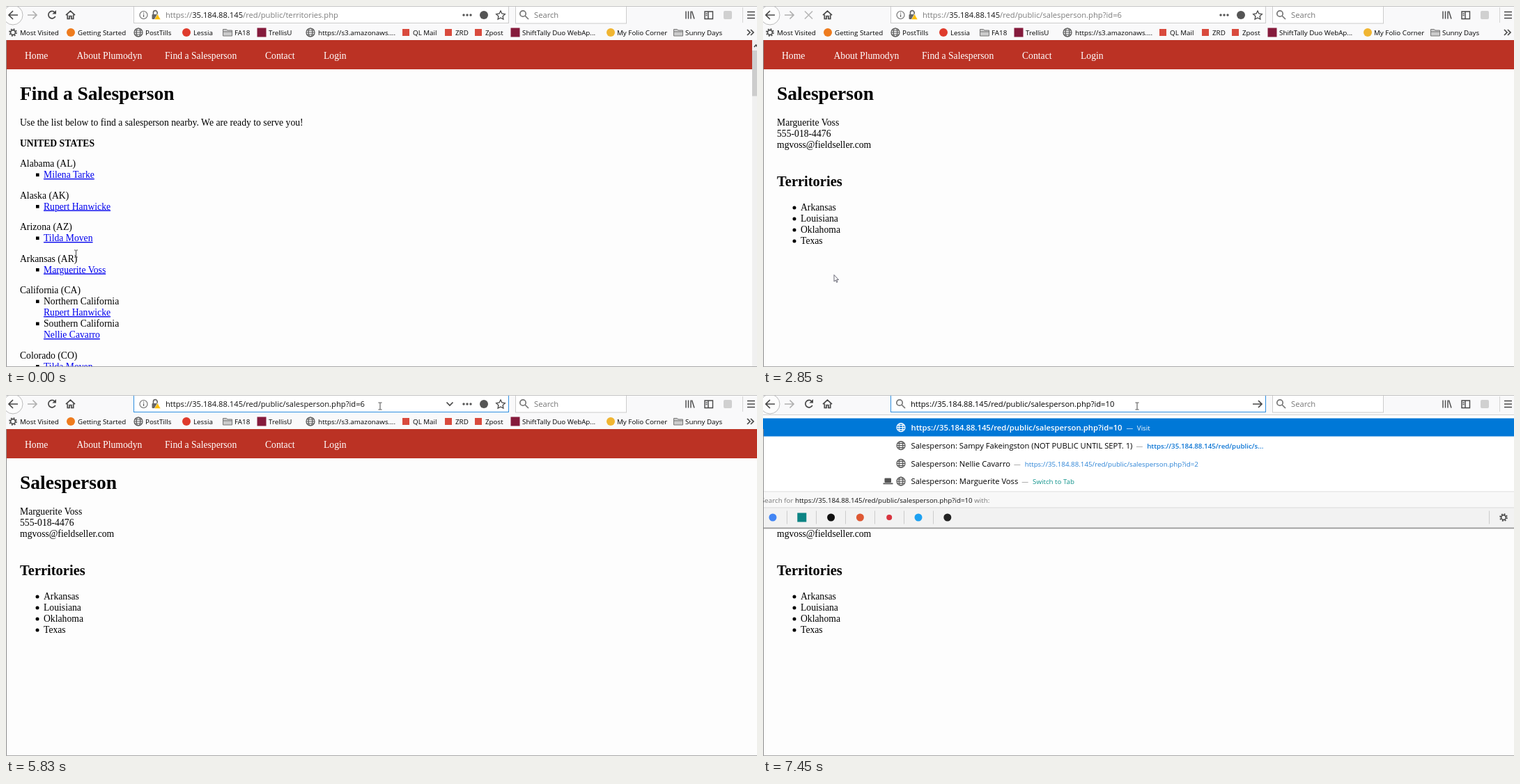
Animation, 1078 px wide and 519 px high, one loop 8000 ms. Source, as an HTML page:

```html
<!DOCTYPE html>
<html lang="en">
<head>
<meta charset="utf-8">
<title>Find a Salesperson</title>
<style>
html, body { margin: 0; width: 100%; height: 100%; overflow: hidden; background: #fdfdfd; }
svg { display: block; }
text { white-space: pre; }
.page { font: 13.68px "Liberation Serif", "Times New Roman", serif; }
.h1 { font-size: 27.5px; font-weight: bold; }
.h2 { font-size: 20.5px; font-weight: bold; }
.b { font-weight: bold; }
.link { fill: #00e; text-decoration: underline; }
.ui { font: 11.2px "Open Sans", "Noto Sans", sans-serif; }
.mark { font-size: 9.8px; }
.small { font-size: 9.75px; }
.semi { font-weight: 600; }
.line { fill: none; stroke: #484848; stroke-width: 1.7; }
</style>
</head>
<body>
<svg id="stage" width="1078" height="519" viewBox="0 0 1078 519"></svg>
<script>
const LOOP = 8000;
const HOST = '35.184.88.145';
const SALES = '/red/public/salesperson.php?id=';

const text = (x, y, s, cls = '', fill = '#000') => `<text x="${x}" y="${y}" class="${cls}" fill="${fill}">${s}</text>`;
const rect = (x, y, w, h, fill, more = '') => `<rect x="${x}" y="${y}" width="${w}" height="${h}" fill="${fill}" ${more}/>`;
const dot = (x, y, r, fill) => `<circle cx="${x}" cy="${y}" r="${r}" fill="${fill}"/>`;
const line = (d, more = '') => `<path class="line" d="${d}" ${more}/>`;
const at = (x, y, s) => `<g transform="translate(${x} ${y})">${s}</g>`;
// Content visible from one time up to another
const during = (from, to, s) => `<g data-from="${from}" data-to="${to}">${s}</g>`;

const globe = (x, y, color = '#555') => at(x, y, `<g fill="none" stroke="${color}" stroke-width="1.2">
  <circle r="6"/><ellipse rx="2.8" ry="6"/><path d="M-6 0H6M-5 -3H5M-5 3H5"/></g>`);
const gear = (x, y) => at(x, y, `<g fill="none" stroke="#484848" stroke-width="1.6"><circle r="3.4"/>
  <circle r="5" stroke-dasharray="2 1.93"/></g>`);
const folder = (x, y) => at(x, y, `<path d="M-6.5 5V-4.5H-1.5L0 -3H6.5V5ZM-6.5 -1H6.5" fill="#ccc" stroke="#777"/>`);
const lens = (x, y, color = '#777') => line(`M${x + 1} ${y + 2}l5 5`, `style="stroke:${color}"`)
  + `<circle class="line" cx="${x - 2}" cy="${y - 1}" r="4.2" style="stroke:${color}"/>`;
const block = (x, y, fill, size = 13) => rect(x - size / 2, y - size / 2, size, size, fill);

// Cursors
const arrow = (x, y) => at(x, y, '<path d="M0 0V9.6L2.2 7.6 3.7 10.9 5 10.3 3.6 7.1H6.5Z" fill="#fff" stroke="#445" stroke-width=".8"/>');
const beam = (x, y) => at(x, y, '<path d="M-2.5 -5H-.6L0 -4.5 .6 -5H2.5M0 -4.5V4.5M-2.5 5H-.6L0 4.5 .6 5H2.5" fill="none" stroke="#333" stroke-width=".9"/>');
const hand = (x, y) => at(x, y, `<path d="M-1 7V1Q0 -.6 1 1V5L5 6Q6 6.5 5.6 8.5L4.6 12H-.2L-3.4 8Q-3.6 6.3 -2.4 6.5Z"
  fill="#fff" stroke="#333" stroke-width=".9"/>`);

function page() {
  const nav = [[27, 'Home'], [101.5, 'About Plumodyn'], [228, 'Find a Salesperson'], [372, 'Contact'], [456, 'Login']];
  return rect(0, 49, 1078, 42, '#bb3224') + nav.map(([x, s]) => text(x, 76, s, '', '#fff')).join('');
}

function territories() {
  const states = [
    ['Alabama (AL)', '*Milena Tarke'], ['Alaska (AK)', '*Rupert Hanwicke'], ['Arizona (AZ)', '*Tilda Moven'],
    ['Arkansas (AR)', '*Marguerite Voss'],
    ['California (CA)', 'Northern California', '*Rupert Hanwicke', 'Southern California', '*Nellie Cavarro'],
    ['Colorado (CO)', '*Tilda Moven'],
  ];
  let y = 231;
  let out = text(20, 135, 'Find a Salesperson', 'h1')
    + text(20, 172, 'Use the list below to find a salesperson nearby. We are ready to serve you!')
    + text(20, 201.5, 'UNITED STATES', 'b');
  for (const [state, ...people] of states) {
    out += text(20, y, state);
    people.forEach((p, i) => {
      y += 16;
      const linked = p[0] === '*';
      if (i % 2 === 0) out += rect(43, y - 6.5, 4.6, 4.6, '#000');
      out += linked ? text(54, y, p.slice(1), 'link', '#00e') : text(54, y, p);
    });
    y += 29.5;
  }
  return out + rect(1071, 49, 7, 470, '#f0f0f0') + rect(1071, 64, 7, 65.5, '#cdcdcd')
    + line('M1074 59l2.5 -3 2.5 3', 'stroke-width="1.2"');
}

function person() {
  const places = ['Arkansas', 'Louisiana', 'Oklahoma', 'Texas'];
  return text(20, 135, 'Salesperson', 'h1')
    + ['Marguerite Voss', '555-018-4476', 'mgvoss@fieldseller.com'].map((s, i) => text(20, 172 + 16 * i, s)).join('')
    + text(20, 259, 'Territories', 'h2')
    + places.map((s, i) => dot(45, 290 + 16 * i, 2.5, '#000') + text(54, 294 + 16 * i, s)).join('');
}

function bookmarks() {
  const square = c => x => block(x, 38, c);
  const round = c => x => dot(x, 38, 6, c);
  const world = x => globe(x, 38);
  const files = x => folder(x, 38);
  const mail = x => block(x, 38, '#d94a3d', 10);
  const items = [
    [10, 20, 'Most Visited', x => gear(x, 38)], [93, 103, 'Getting Started', round('#ee7b1e')],
    [190, 200, 'PostTills', world], [259, 269, 'Lessia', round('#df3b2c')], [318, 328, 'FA18', files],
    [367, 377, 'TrellisU', square('#851b3c')], [437, 448, 'https://s3.amazonaws....', world],
    [574, 584, 'QL Mail', mail], [635, 645, 'ZRD', mail], [678, 688, 'Zpost', mail],
    [731, 741, 'ShiftTally Duo WebAp...', square('#851b3c')], [868, 877, 'My Folio Corner', round('#f0b531')],
    [965, 975, 'Sunny Days', files],
  ];
  return items.map(([x, tx, s, icon]) => icon(x) + text(tx, 42, s, 'mark')).join('')
    + line('M1064 34l4 4 -4 4M1069 34l4 4 -4 4');
}

function toolbar() {
  const stop = c => line('M60 7.5l11 11M71 7.5l-11 11', `style="stroke:${c}"`);
  const reload = c => line('M70 9.2A5.2 5.2 0 1 0 70.8 14.8', `style="stroke:${c}"`) + `<path d="M72 6v5.6h-5.6Z" fill="${c}"/>`;
  const dark = '#484848', pale = '#b8b8b8';
  return '<circle cx="10" cy="13" r="14" fill="#fdfdfd" stroke="#bbb"/>'
    + line('M17 13H4M10 7l-6 6 6 6') + line('M31 13H44M38.5 7.5l5.5 5.5 -5.5 5.5', 'style="stroke:#b0b0b0"')
    + during(0, 1120, reload(dark)) + during(1120, 2850, stop(dark)) + during(2850, 3010, stop(pale))
    + during(3010, 3740, reload(pale)) + during(3740, LOOP, reload(dark))
    + line('M86 13.2l6.5 -6 6.5 6M88.3 12.5v6h2.8v-4h2.8v4h2.8v-6')
    + rect(731.5, -1, 159, 26, '#fff', 'stroke="#ccc"') + lens(744, 12) + text(758, 17, 'Search', '', '#777')
    + line('M976 7.5v11M979.5 7.5v11M983 7.5v11M984.5 7.5l3.5 11', 'style="stroke-width:1.4"')
    + line('M1003 8h11.5v10.5h-11.5ZM1008 8v10.5M1004.5 11h2M1004.5 13.5h2', 'style="stroke-width:1.4"')
    + rect(1030, 7, 12, 12, '#d0d0d0', 'rx="2"') + rect(1057, 2, 1, 22, '#d5d5d5')
    + line('M1064 8.5h11M1064 13h11M1064 17.5h11');
}

function addressBar() {
  const frame = (from, to, c) => during(from, to, rect(183.5, -1, 538, 25.5, '#fff', `stroke="${c}"`));
  const address = (path, strong = '#111', weak = '#7d7d7d') =>
    text(229, 17, `https://<tspan fill="${strong}">${HOST}</tspan>${path}`, '', weak);
  const typed = (from, to, id) => during(from, to, text(212, 17, `https://${HOST}${SALES}${id}`));
  const icons = '<circle class="line" cx="197.5" cy="13" r="5.5" style="stroke:#666;stroke-width:1.1"/>'
    + rect(196.9, 12, 1.3, 4, '#666') + rect(196.9, 9.5, 1.3, 1.4, '#666')
    + line('M211.5 12V9.5a2.8 2.8 0 0 1 5.6 0V12', 'style="stroke:#666"') + rect(209.5, 12, 9, 7, '#666', 'rx="1"')
    + '<path d="M217.5 11.5l4.5 8h-9Z" fill="#ffbf00" stroke="#fff" stroke-width=".6"/>'
    + [657, 662, 667].map(x => dot(x, 13, 1.7, '#555')).join('') + dot(686, 13, 6, '#555')
    + line('M710 7l1.9 4 4.4.6 -3.2 3.1.8 4.4 -3.9 -2.1 -3.9 2.1.8 -4.4 -3.2 -3.1 4.4 -.6Z', 'style="stroke-width:1.3"');
  const chevron = line('M632.5 10.5l4.5 4.5 4.5 -4.5');
  return frame(0, 4160, '#ccc') + frame(4160, 4820, '#aaa') + frame(4820, LOOP, '#2f8fe0')
    + during(0, 6260, icons)
    + during(4160, 4570, `<g opacity=".85">${chevron}</g>`) + during(4570, 6260, chevron)
    + during(0, 1120, address('/red/public/territories.php'))
    + during(1120, 4820, address(SALES + 6))
    + during(4820, 4960, address(SALES + 6, '#111', '#111'))
    + during(4960, 5520, rect(229, 4, 286, 16, '#0078d7') + address(SALES + 6, '#fff', '#fff'))
    + during(5520, 6260, address(SALES + 6, '#111', '#111'))
    + during(5520, 5830, rect(514, 4, 1, 16, '#000'))
    + during(6260, LOOP, lens(198, 12) + line('M703 13H716M711 8l5 5 -5 5'))
    + typed(6260, 6980, '') + typed(6980, 7450, 1) + typed(7450, LOOP, 10)
    + during(6260, 6980, rect(491, 5, 1, 15, '#000'));
}

function searchStrip(id) {
  const engines = ['#4285f4', '', '#111', '#de5833', '#d8343f', '#1da1f2', '#222'];
  return rect(0, 62, 1078, 1, '#d4d4d4') + rect(0, 63, 1078, 23, '#f8f8f8')
    + rect(0, 86, 1078, 28, '#f2f2f2') + rect(0, 85, 1078, 1, '#d9d9d9') + rect(0, 114, 1078, 1.8, '#999')
    + text(-3, 78.5, `Search for <tspan fill="#111">https://${HOST}${SALES}${id}</tspan> with:`, 'small', '#777')
    + engines.map((c, i) => {
      const x = 14 + 41.8 * i;
      return (c ? dot(x, 99.5, i === 4 ? 4 : 5.5, c) : block(x, 99.5, '#0c8484')) + (i < 6 ? rect(34 + 42 * i, 90, 1, 19, '#ccc') : '');
    }).join('')
    + rect(1042, 90, 1, 19, '#ccc') + gear(1063, 99.5);
}

function popup(from, to, id, expanded) {
  const url = `https://${HOST}/red/public/s`;
  const dash = '<tspan dx="5" class="small" fill="#888">—</tspan>';
  const tail = (s, fill, cls = '') => `${dash}<tspan dx="6" class="small ${cls}" fill="${fill}">${s}</tspan>`;
  const rows = [
    'Salesperson: Sampy Fakeingston (NOT PUBLIC UNTIL SEPT. 1)' + tail(url + '...', '#0a74d4', 'semi'),
    'Salesperson: Nellie Cavarro' + tail(`https://${HOST}${SALES}2`, '#2b83d6'),
    'Salesperson: Marguerite Voss' + tail('Switch to Tab', '#12948c'),
  ];
  const list = rows.map((s, i) => globe(198, 72.7 + 25.7 * i) + text(212.5, 77 + 25.7 * i, s)).join('')
    + rect(174.5, 119.5, 9.5, 6.5, '#555', 'rx="1"') + rect(172.5, 126.5, 14, 1.8, '#555');
  return during(from, to,
    rect(0, 28, 1078, expanded ? 163 : 86, '#fff') + rect(0, 28, 1078, 1, '#d0d0d0')
    + rect(0, 33.5, 1078, 26, '#0078d7') + globe(198, 46.7, '#fff')
    + text(212.5, 51, `<tspan class="semi" font-size="11.3">https://${HOST}${SALES}${id}</tspan><tspan class="small" dx="6">—</tspan><tspan class="small" dx="5.5">Visit</tspan>`, '', '#fff')
    + (expanded ? list + at(0, 76.5, searchStrip(id)) : searchStrip(id)));
}

const pointers = [
  [0, 120, beam(100.5, 356)], [120, 990, hand(102, 371)], [990, 2700, hand(100.5, 387)],
  [2700, 3610, arrow(102, 386.5)], [3610, 3740, arrow(146, 319)], [4010, 4290, beam(560, 19)],
  [4290, 4420, arrow(544, 30)], [4420, LOOP, beam(537, 16)],
];

const stage = document.getElementById('stage');
stage.innerHTML = rect(0, 0, 1078, 519, '#fdfdfd')
  + `<g class="page">${page()}${during(0, 2850, territories())}${during(2850, LOOP, person())}</g>`
  + `<g class="ui">${rect(0, 0, 1078, 49, '#f9f9fa')}${toolbar()}${bookmarks()}${addressBar()}`
  + popup(6260, 6650, '', false) + popup(6650, 6980, '', true) + popup(6980, 7450, 1, true) + popup(7450, LOOP, 10, true)
  + '</g>' + rect(0, 0, 1078, 1, '#c4c4c4') + rect(0, 49, 1, 470, '#8c8c8c') + rect(0, 518, 1078, 1, '#a8a8a8')
  + pointers.map(p => during(...p)).join('');

const timed = [...stage.querySelectorAll('[data-from]')].map(el => ({ el, from: +el.dataset.from, to: +el.dataset.to }));
const start = performance.now();

function draw() {
  const t = (performance.now() - start) % LOOP;
  for (const { el, from, to } of timed) el.style.display = t >= from && t < to ? '' : 'none';
  requestAnimationFrame(draw);
}
draw();
</script>
</body>
</html>
```
